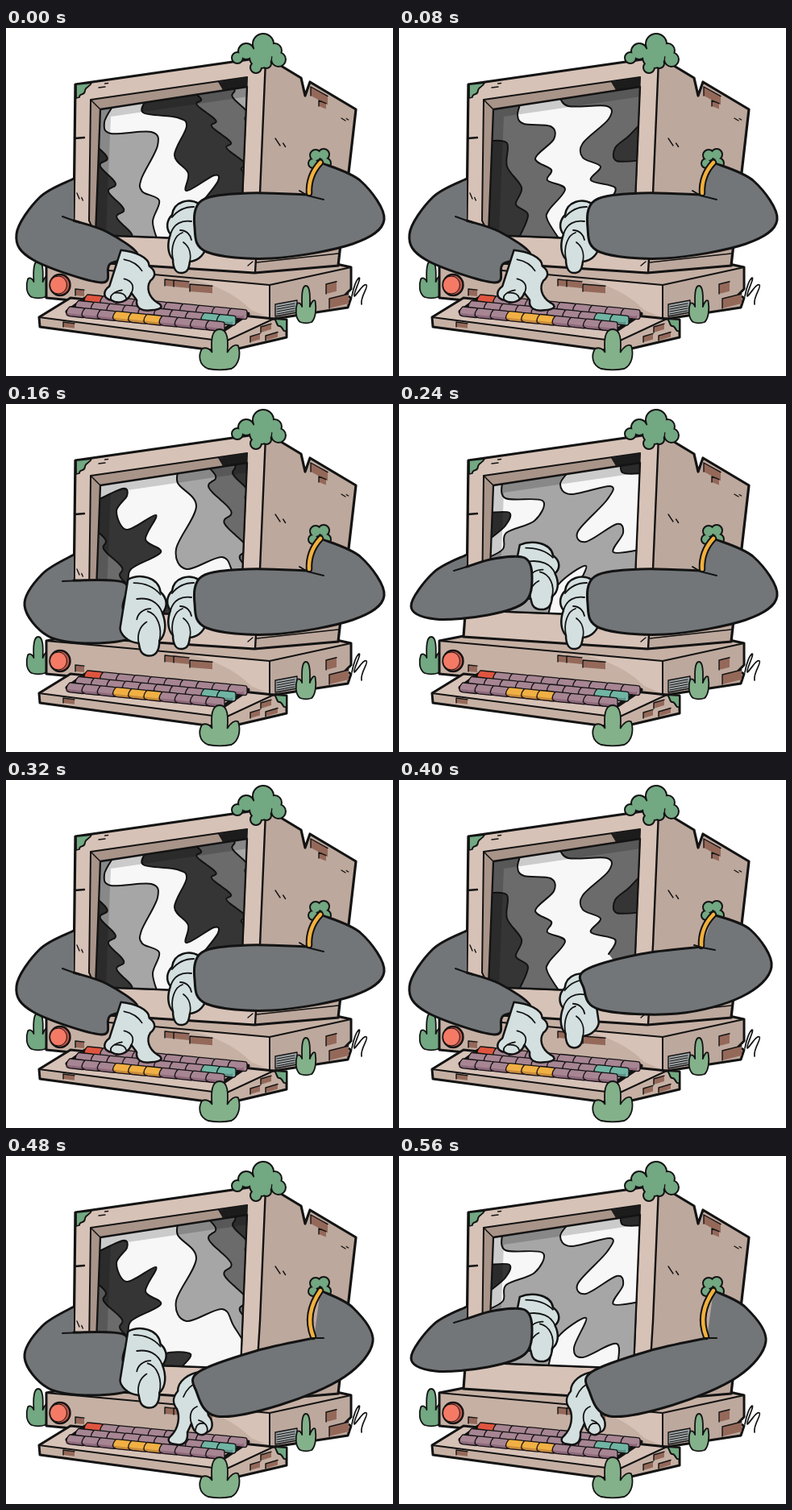
An HTML page with a canvas for the animation above (640 ms loop, 480x432 px).

```html
<!DOCTYPE html>
<html lang="en">
<head>
<meta charset="utf-8">
<title>Typing computer</title>
<style>
  html, body { margin: 0; width: 100%; height: 100%; overflow: hidden; background: #fff; }
  canvas { display: block; width: 480px; height: 432px; }
</style>
</head>
<body>
<canvas id="stage" width="480" height="432"></canvas>
<script>
const g = document.getElementById('stage').getContext('2d');
const STEP = 80;
const INK = '#131313', FRONT = '#d7c2b7', SIDE = '#bda89d', BASE = '#c6b0a4', BRICK = '#94695a';
const MOSS = '#72a882', LEAF = '#82b18a', SLEEVE = '#737679', GLOVE = '#d4e0e0';
const DARK = '#353535', MID = '#6b6b6b', PALE = '#a6a6a6', WHITE = '#f7f7f7';

const toPath = d => d instanceof Path2D ? d : new Path2D(d);

function fill(d, color) {
  g.fillStyle = color;
  g.fill(toPath(d));
}

function line(d, width = 1.8, color = INK) {
  g.lineWidth = width;
  g.strokeStyle = color;
  g.stroke(toPath(d));
}

function shape(d, color, width = 3) {
  fill(d, color);
  line(d, width);
}

// Places a unit drawing without scaling its line width.
function place(d, x, y, sx, sy) {
  const p = new Path2D();
  p.addPath(new Path2D(d), new DOMMatrix([sx, 0, 0, sy, x, y]));
  return p;
}

// Smooth curve through the points.
function spline(pts) {
  const p = new Path2D(), last = pts.length / 2 - 1;
  const at = (i, k) => pts[2 * Math.max(0, Math.min(last, i)) + k];
  p.moveTo(pts[0], pts[1]);
  for (let i = 0; i < last; i++) {
    const c = [0, 1].map(k => at(i, k) + (at(i + 1, k) - at(i - 1, k)) / 6);
    const e = [0, 1].map(k => at(i + 1, k) - (at(i + 2, k) - at(i, k)) / 6);
    p.bezierCurveTo(...c, ...e, at(i + 1, 0), at(i + 1, 1));
  }
  return p;
}

// Wavy edge along a straight line.
function ripple(x0, y0, x1, y1, amp, waves) {
  const pts = [], n = waves * 8;
  for (let i = 0; i <= n; i++) {
    const t = i / n, s = amp * Math.sin(t * waves * 2 * Math.PI);
    pts.push(x0 + (x1 - x0) * t + s, y0 + (y1 - y0) * t + s * .4);
  }
  return pts;
}

// Fills everything on one side of a curve, or the curve itself.
function band(color, pts, side) {
  const curve = spline(pts), area = new Path2D(curve);
  if (side) {
    area.lineTo(side, 280);
    area.lineTo(side, 60);
  }
  fill(area, color);
  line(curve, 2);
}

const LEFT = 100, RIGHT = 310;

const screens = [
  () => {
    fill('M100 60H310V280H100Z', PALE);
    band(DARK, ripple(116, 150, 152, 262, 7, 3.5), LEFT);
    band(WHITE, [133, 96, 122, 117, 130, 131, 180, 129, 188, 146, 168, 187, 169, 203, 190, 214, 182, 240, 188, 264], RIGHT);
    band(DARK, [176, 86, 170, 105, 212, 111, 224, 122, 209, 158, 226, 180, 224, 202, 258, 183, 263, 190, 245, 214], RIGHT);
    band(MID, ripple(230, 78, 304, 186, 7, 4), RIGHT);
    band(PALE, ripple(274, 66, 306, 124, 5, 2), RIGHT);
  },
  () => {
    fill('M100 60H310V280H100Z', MID);
    band(DARK, [112, 140, 134, 143, 134, 172, 152, 198, 145, 219, 160, 232, 148, 262], LEFT);
    band(WHITE, [152, 90, 147, 108, 155, 119, 188, 122, 192, 138, 169, 162, 189, 176, 184, 189, 206, 200, 186, 226, 184, 238, 200, 264], RIGHT);
    band(MID, [198, 82, 210, 97, 258, 97, 260, 113, 228, 143, 228, 161, 250, 172, 238, 189, 268, 198, 260, 216], RIGHT);
    band(DARK, [304, 114, 285, 134, 268, 149, 270, 165, 304, 164]);
  },
  () => {
    fill('M100 60H310V280H100Z', WHITE);
    band(DARK, [112, 120, 145, 105, 150, 114, 137, 133, 150, 156, 186, 138, 173, 168, 192, 184, 155, 205, 153, 226], LEFT);
    band(MID, ripple(112, 157, 153, 226, 6, 2), LEFT);
    band(PALE, [215, 78, 213, 98, 236, 127, 211, 180, 224, 205, 268, 190, 283, 212, 304, 245], RIGHT);
    band(MID, ripple(246, 74, 304, 207, 9, 3), RIGHT);
    band(DARK, ripple(275, 66, 306, 128, 5, 2), RIGHT);
    band(DARK, [193, 262, 199, 245, 229, 246, 216, 264]);
  },
  () => {
    fill('M100 60H310V280H100Z', PALE);
    band(WHITE, [128, 96, 132, 117, 178, 120, 168, 145, 133, 160, 129, 180, 108, 192], LEFT);
    band(DARK, [112, 135, 137, 135, 132, 151, 112, 168]);
    band(WHITE, [214, 80, 200, 99, 213, 112, 262, 102, 258, 119, 222, 158, 232, 171, 270, 149, 278, 160, 266, 184, 304, 180], RIGHT);
    band(DARK, [276, 64, 277, 85, 304, 86], RIGHT);
    band(WHITE, [185, 262, 197, 225, 232, 201, 217, 238, 228, 250, 270, 233, 270, 265]);
  }
];

// A union of circles with one outline.
function clump(color, circles) {
  const p = new Path2D();
  for (const [x, y, r] of circles) {
    p.moveTo(x + r, y);
    p.arc(x, y, r, 0, 7);
  }
  line(p, 4);
  fill(p, color);
}

function frond(color, x, y, w, h) {
  shape(place('M-.3 0C-.55 -.1 -.55 -.35 -.46 -.5C-.36 -.56 -.24 -.5 -.2 -.42C-.22 -.7 -.22 -1 0 -1C.22 -1 .22 -.7 .2 -.42C.28 -.55 .4 -.64 .48 -.58C.55 -.36 .5 -.1 .3 0Q0 .06 -.3 0Z', x, y, w, h), color, 1.8);
}

function brick(x, y, w, h, slope) {
  const dy = w * slope;
  fill(`M${x} ${y}l${w} ${dy}v${h}l${-w} ${-dy}Z`, BRICK);
  line(`M${x} ${y + h}v${-h}l${w} ${dy}`, 1.4);
}

function crack(x, y, dx, dy) {
  line(`M${x} ${y}l${dx} ${dy}m${dy * .4} ${-dx * .5}l${dx * .5} ${dy * .5}`, 1.4);
}

function key(x, y, w, color) {
  shape(`M${x + 3} ${y}l${w - 4} 1.5q3 0 3 3v6q0 3 -3 3l${4 - w} -1.6q-5 -1 -5 -4q0 -4 4 -8Z`, color, 1.3);
  fill(`M${x} ${y + 8}l${w - 5} 1.7q3 0 3 -3v5q0 2 -3 2l${4 - w} -1.6q-3 -1 -2 -4Z`, 'rgba(40,0,30,.2)');
}

function keyColor(row, col) {
  if (row === 0 && col === 0) return '#df553f';
  if (row === 1 && col > 7) return '#70b5a4';
  if (row === 2 && col > 2 && col < 6) return '#f1b044';
  return '#a78593';
}

function keyboard() {
  const body = 'M41 359L80 335L332 361L348 362V384L271 402L42 371Z';
  fill(body, BASE);
  fill('M41 359L80 335L332 361L272 389Z', FRONT);
  line('M41 359L272 389L332 361M272 389L271 402', 2);
  line(body, 3);
  brick(316, 371, 13, 7, -.3);
  brick(303, 383, 12, 7, -.3);
  brick(322, 382, 15, 6, -.3);
  brick(71, 365, 14, 6, .13);
  shape('M333 361L348 362V376C342 378 344 370 339 370C336 371 336 364 333 361Z', MOSS, 2);
  line('M98 336L300 355L270 375L76 352Z', 5);
  for (let row = 0; row < 3; row++) {
    const w = 19.8 - row * .3;
    for (let col = 0; col < 10; col++) {
      key(99 - row * 11 + col * w, 331 + row * 7.5 + col * 1.9, w, keyColor(row, col));
    }
  }
}

function base() {
  frond(MOSS, 40, 334, 28, 45);
  const body = 'M50 294L80 288L410 293L428 297V324L421 331L428 335L424 347L326 362L50 335Z';
  fill(body, BASE);
  fill('M327 319L428 297V324L421 331L428 335L424 347L326 362Z', SIDE);
  fill('M232 312L327 320V360L304 350C286 332 266 321 232 312Z', FRONT);
  line('M50 294L327 319L428 297M327 319V361', 2);
  line(body, 3);
  shape('M334 343L361 338V353L334 358Z', '#9ba1a3', 1.4);
  for (let y = 346; y < 358; y += 3) line(`M336 ${y}l22 -4`, 1);
  brick(197, 312, 11, 8, .1);
  brick(208, 313, 19, 8, .1);
  brick(228, 318, 28, 9, .08);
  brick(86, 324, 11, 8, .1);
  brick(397, 318, 13, 12, -.25);
  brick(401, 336, 24, 12, -.25);
  for (const [r, color] of [[12.5, '#c2574a'], [10.5, '#f47a66']]) {
    const p = new Path2D();
    p.ellipse(54.5 + r, 319, r, r + .5, 0, 0, 7);
    shape(p, color, r > 11 ? 2.4 : 1);
  }
  line('M429 333C431 323 434 313 438 310C441 310 430 331 432 333C436 330 444 316 447 319C450 321 439 334 441 343', 1.7);
}

function monitor(screen) {
  const body = 'M86 70L323 36L366 62L371 84L377 67L434 101L424 188L412 295L308 304L80 289L84 235Z';
  const glass = 'M117 101L299 73L291 264L111 257Z';
  fill(body, FRONT);
  fill('M322 38L366 62L371 84L377 67L434 101L424 188L412 295L308 304L315 205Z', SIDE);
  brick(378, 73, 21, 11, .55);
  brick(388, 90, 9, 7, .4);
  line(body, 3.2);
  line('M322 40L315 205L309 303', 2.4);
  line('M311 291L412 280', 1.6);
  shape('M105 89L299 61L291 264L111 257L103 239Z', '#a99489', 2);
  fill('M263 67L299 61V75L269 77Z', '#1c1c1c');
  g.save();
  g.clip(new Path2D(glass));
  screen();
  fill('M110 102L300 73V85L130 110L124 258H109Z', 'rgba(0,0,0,.18)');
  g.restore();
  line(glass, 2.3);
  line('M105 89L117 101', 1.5);
  line('M85 137L97 136', 2.3);
  crack(334, 137, 6, 9);
  crack(88, 205, 3, 7);
  crack(115, 74, 8, -1);
  crack(416, 112, 5, 3);
  crack(300, 295, 6, -5);
  shape('M87 70L106 68C104 74 98 73 98 78C97 85 91 80 91 86L87 87Z', MOSS, 1.8);
  clump(MOSS, [[287, 37, 6], [298, 29, 9], [319, 20, 12], [333, 28, 8], [338, 39, 8], [316, 36, 13], [310, 49, 6], [323, 44, 5]]);
  clump(MOSS, [[384, 158, 6], [394, 157, 6], [381, 168, 5], [396, 168, 6]]);
}

function leaves() {
  frond(LEAF, 372, 365, 24, 45);
  frond(LEAF, 265, 423, 48, 49);
}

const hoverHand = {
  d: 'M17 -42C5 -49 -14 -45 -16 -28C-24 -20 -23 -10 -18 -4C-22 7 -22 20 -15 27C-15 39 -11 45 -3 44C4 43 5 37 6 30C18 29 25 19 25 13Z',
  folds: 'M-16 -25C-9 -34 0 -38 11 -38M-18 -4C-14 -17 -4 -22 8 -20M-15 27C-18 12 -13 -3 -3 -6M6 30C8 20 5 11 -2 6M-6 -9C2 -9 7 -3 8 3'
};
const pressHand = {
  d: 'M8 -45C-5 -43 -19 -34 -19 -21C-26 -13 -25 -5 -20 1C-16 11 -18 25 -27 34C-33 39 -31 44 -21 45C-12 47 -6 42 -7 30C-5 25 -3 22 -2 19C1 32 11 37 17 30C25 28 26 17 19 9Z',
  folds: 'M-2 19C-5 10 -3 1 5 -2M17 30C20 23 14 17 7 15M3 27C4 20 8 18 14 19M-12 -14C-8 -24 -2 -29 5 -31'
};

function hand({ d, folds }, at) {
  shape(place(d, ...at), GLOVE, 2.5);
  line(place(folds, ...at), 1.8);
}

function sleeve(pts) {
  const p = spline(pts);
  fill(p, SLEEVE);
  line(p, 3);
}

// Hands are placed by x, y, width and height factors.
const leftPress = {
  arm: [84, 187, 42, 210, 13, 256, 34, 288, 118, 316, 129, 293, 163, 281, 125, 253, 84, 239],
  fold: 'M70 234L92 242', hand: pressHand, at: [153, 313, -1.3, .83]
};
const leftLift = {
  arm: [84, 187, 45, 211, 23, 250, 52, 288, 106, 297, 158, 288, 145, 254, 147, 222, 84, 219],
  fold: 'M70 220L94 219', hand: hoverHand, at: [172, 264, -1.22, 1.1]
};
const leftHigh = {
  arm: [84, 187, 43, 209, 15, 251, 45, 267, 110, 262, 156, 246, 165, 215, 156, 191, 118, 192, 84, 202],
  fold: 'M68 207L94 199', hand: hoverHand, at: [171, 214, -1.25, .93], behind: true
};
const rightRest = {
  arm: [390, 167, 440, 190, 469, 238, 430, 268, 330, 286, 249, 278, 234, 248, 243, 214, 300, 205, 374, 207],
  cuff: 'M390 167Q375 183 376 205', fold: 'M364 202L374 208L394 213', hand: hoverHand, at: [222, 260, 1, 1]
};
const rightLower = {
  arm: [390, 167, 436, 186, 462, 232, 425, 269, 345, 290, 249, 285, 229, 258, 231, 236, 300, 216, 376, 207],
  cuff: 'M390 167Q374 183 375 206', fold: 'M366 205L376 208L392 211', hand: hoverHand, at: [222, 287, 1.03, 1.03]
};
const rightPress = {
  arm: [390, 167, 430, 188, 455, 230, 420, 274, 340, 309, 261, 323, 236, 292, 239, 268, 310, 242, 382, 226],
  cuff: 'M390 167Q370 196 381 224', fold: 'M378 226L394 226', hand: pressHand, at: [232, 313, 1, 1]
};

function leftArm(p) {
  if (p.behind) hand(p.hand, p.at);
  sleeve(p.arm);
  line(p.fold, 2);
  if (!p.behind) hand(p.hand, p.at);
}

function rightArm(p) {
  hand(p.hand, p.at);
  sleeve(p.arm);
  line(p.cuff, 8.5);
  line(p.cuff, 4.5, '#f2b13d');
  line(p.fold, 2);
}

const leftCycle = [leftPress, leftPress, leftLift, leftHigh];
const rightCycle = [...Array(5).fill(rightRest), rightLower, rightPress, rightPress];

function draw(time) {
  const step = Math.floor(time / STEP) % 8;
  g.fillStyle = '#fff';
  g.fillRect(0, 0, 480, 432);
  g.lineJoin = g.lineCap = 'round';
  base();
  monitor(screens[step % 4]);
  keyboard();
  leaves();
  leftArm(leftCycle[step % 4]);
  rightArm(rightCycle[step]);
}

const start = performance.now();
function loop() {
  draw(performance.now() - start);
  requestAnimationFrame(loop);
}
loop();
</script>
</body>
</html>
```
